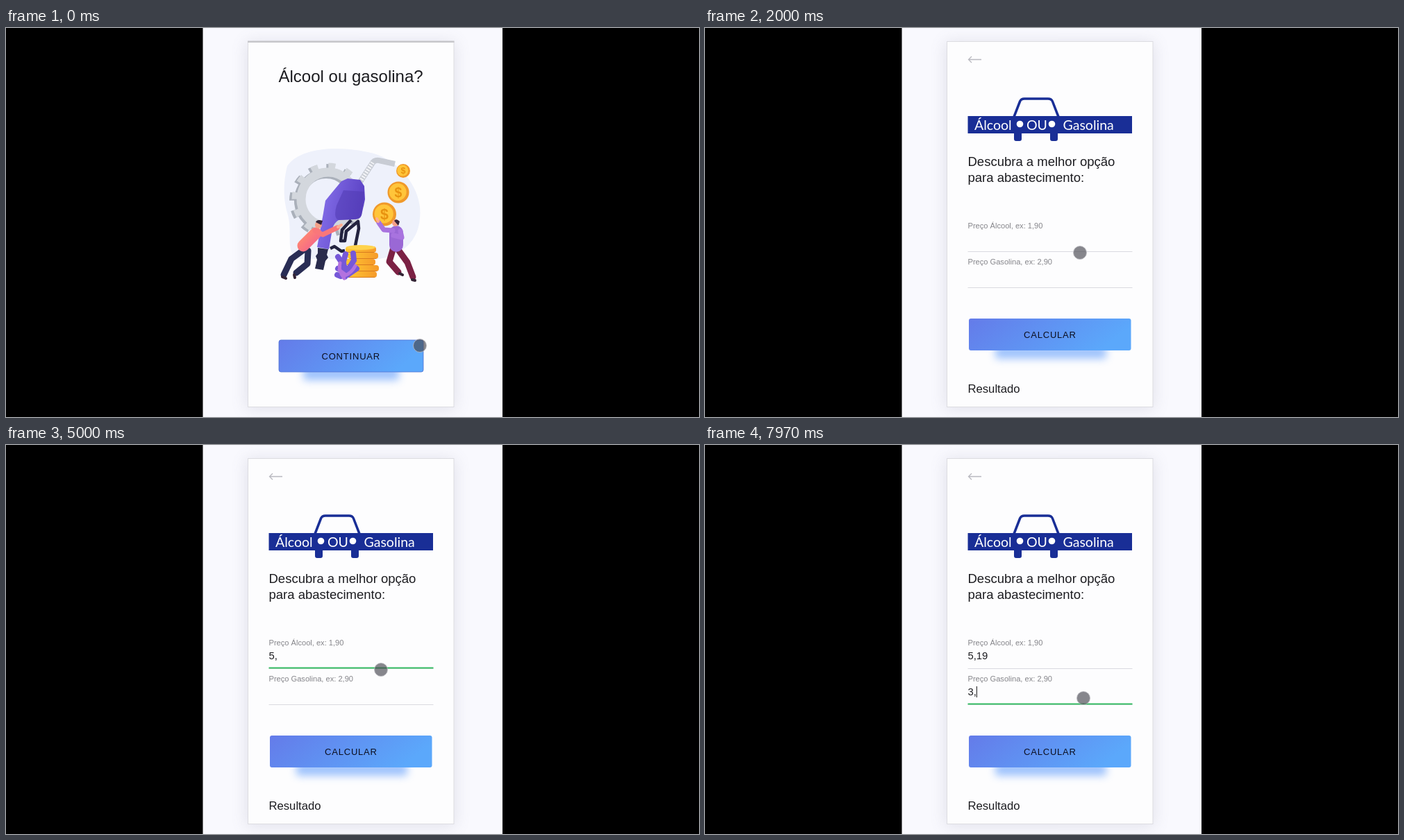
An HTML page for the animation above (8 s loop, 998x561 px).

```html
<!DOCTYPE html>
<html lang="pt">
<head>
<meta charset="utf-8">
<title>Álcool ou gasolina?</title>
<style>
  html, body { margin: 0; width: 100%; height: 100%; overflow: hidden; background: #000; }
  svg { display: block; width: 100vw; height: 100vh; }
  text { font-family: "Liberation Sans", Arial, sans-serif; fill: #1c1c20; }
  .title { font-size: 24px; }
  .lead { font-size: 18.5px; }
  .label { font-size: 11.1px; fill: #85858a; }
  .value { font-size: 14.8px; }
  .result { font-size: 16.67px; }
  .button { font-size: 13px; letter-spacing: .8px; fill: #0c0f20; }
  .brand { font-family: Lato, sans-serif; font-size: 19.5px; fill: #fff; }
  .coin { font-weight: bold; fill: #e8920f; text-anchor: middle; }
</style>
</head>
<body>
<svg viewBox="0 0 998 561">
  <defs>
    <linearGradient id="blue" x1="0" y1="0" x2="1" y2=".25">
      <stop offset="0" stop-color="#647be9"/><stop offset="1" stop-color="#5ba8fb"/>
    </linearGradient>
    <linearGradient id="pump" x1="0" y1="0" x2="1" y2=".3">
      <stop offset="0" stop-color="#8a75ee"/><stop offset="1" stop-color="#5b42c4"/>
    </linearGradient>
    <linearGradient id="gold">
      <stop offset="0" stop-color="#ffc933"/><stop offset="1" stop-color="#f69a2a"/>
    </linearGradient>
    <linearGradient id="shirt" x1="0" y1="0" x2="1" y2="1">
      <stop offset="0" stop-color="#ff8a70"/><stop offset="1" stop-color="#f4668a"/>
    </linearGradient>
    <filter id="soft" x="-20%" y="-100%" width="140%" height="300%"><feGaussianBlur stdDeviation="6"/></filter>
    <filter id="halo" x="-20%" y="-20%" width="140%" height="140%"><feGaussianBlur stdDeviation="11"/></filter>
    <clipPath id="card"><rect x="348" y="19" width="297" height="527"/></clipPath>
    <clipPath id="column"><rect x="283.5" width="431.5" height="561"/></clipPath>
  </defs>

  <rect width="998" height="561"/>
  <g clip-path="url(#column)">
    <rect x="283" width="433" height="561" fill="#f9f9fe"/>
    <rect x="346" y="20" width="301" height="530" fill="#70708c" opacity=".17" filter="url(#halo)"/>
  </g>
  <rect x="348" y="19" width="297" height="527" fill="#fdfdfe"/>

  <g clip-path="url(#card)">
    <g id="home">
      <text class="title" x="392.5" y="78">Álcool ou gasolina?</text>
      <path fill="#eef1fb" d="M405 199C422 173 477 169 521 179C565 187 601 232 596 274C594 306 572 329 532 334L420 333C400 321 415 294 404 263C398 238 401 215 405 199Z"/>

      <g fill="none" stroke="#aab0ba" transform="translate(-3 2)">
        <circle cx="464" cy="247" r="39" stroke-width="14"/>
        <circle cx="464" cy="247" r="48" stroke-width="10" stroke-dasharray="11 14.13"/>
      </g>
      <g fill="none" stroke="#d3d7dd">
        <circle cx="464" cy="247" r="39" stroke-width="13"/>
        <circle cx="464" cy="247" r="48" stroke-width="9" stroke-dasharray="10 15.13"/>
      </g>

      <path d="M510 222L527 196Q530 190 537 191L560 196" fill="none" stroke="#c8ccd4" stroke-width="8"/>
      <path d="M512 219L528 194" fill="none" stroke="#f4f5f8" stroke-width="6" stroke-dasharray="2 2"/>
      <path d="M497 277L484 291L482 307L488 307L490 293L507 279L508 289L503 314M467 318L473 315L483 322L488 321" fill="none" stroke="#23233f" stroke-width="4.5" stroke-linejoin="round"/>
      <path fill="url(#pump)" d="M483 221L492 217L510 219L516 228L517 247L512 270Q510 276 501 276L479 277Q472 281 470 290L465 319L448 316L457 267L460 249Q468 239 483 221Z"/>
      <path fill="#513bb3" opacity=".55" d="M486 234L516 236L512 270Q510 276 501 276L479 277Q471 274 476 256Z"/>
      <path fill="#292b4c" d="M449 317L464 319L462 327L464 331L460 336L457 349L445 347L448 334L446 329L449 325Z"/>

      <g id="stack"></g>
      <g stroke="#7658d8" stroke-width="8" stroke-linecap="round" fill="none">
        <path d="M488 359L486 337L489 326M488 352L478 347M488 345L478 330M492 350L501 335L500 325M492 356L505 347M482 358L477 356"/>
      </g>
      <path d="M487 361Q478 350 481 339M488 357Q498 353 503 343M480 349L488 355" fill="none" stroke="#b372df" stroke-width="5" stroke-linecap="round"/>
      <g id="coins"></g>

      <g fill="none" stroke-linecap="round" stroke-linejoin="round">
        <path d="M430 319L411 333L400 356M435 321L434 340L418 353" stroke="#292d55" stroke-width="9"/>
        <path d="M398 359L403 361M415 356L416 360" stroke="#332435" stroke-width="4"/>
        <path d="M446 296L428 314" stroke="url(#shirt)" stroke-width="17"/>
        <path d="M445 292L456 298L477 288" stroke="#f9777a" stroke-width="7"/>
        <path d="M478 287L483 284" stroke="#ffae91" stroke-width="4"/>
        <path d="M557 320L552 337L565 352M565 320L578 338L586 359" stroke="#7b2144" stroke-width="9"/>
        <path d="M567 354L571 356M585 363L589 364" stroke="#332435" stroke-width="4"/>
        <path d="M562 295L562 313" stroke="#9a68d5" stroke-width="20"/>
        <path d="M557 292L544 291L537 281M568 293L570 302L558 299" stroke="#a873df" stroke-width="7"/>
        <path d="M536 279L534 275" stroke="#ffae91" stroke-width="4"/>
      </g>
      <g fill="#f3a088"><circle cx="450" cy="284" r="5"/><circle cx="561" cy="281" r="5"/></g>
      <path fill="#322338" d="M446 280Q448 275 456 278L454 284ZM559 278Q562 274 567 279L565 285Z"/>

      <rect x="428" y="488" width="138" height="20" rx="4" fill="#5e9bfb" opacity=".6" filter="url(#soft)"/>
      <rect x="393" y="450" width="208" height="46" rx="3" fill="url(#blue)" stroke="#4f72d4" stroke-width=".8"/>
      <text class="button" x="454.5" y="477.5">CONTINUAR</text>
    </g>

    <g id="form">
      <rect x="348" y="19" width="297" height="600" fill="#fdfdfe"/>
      <path d="M398 45.5H379.500M384 41L379.500 45.5L384 50" fill="none" stroke="#b9b9c0" stroke-width="1.3"/>
      <path d="M445 128L453.500 106Q455 102 460 102H494Q499 102 500.500 106L509 128" fill="#fdfdfe" stroke="#192e96" stroke-width="3.500"/>
      <path d="M378.500 127H615V152H508V160Q508 163 505 163H500Q497 163 497 160V152H456V160Q456 163 453 163H448Q445 163 445 160V152H378.500Z" fill="#192e96"/>
      <circle cx="453.500" cy="138.500" r="4.800" fill="#fff"/><circle cx="499.500" cy="138.500" r="4.800" fill="#fff"/>
      <text class="brand" x="388" y="147">Álcool</text>
      <text class="brand" x="463" y="147">OU</text>
      <text class="brand" x="515.500" y="147">Gasolina</text>
      <text class="lead" x="378.500" y="199">Descubra a melhor opção</text>
      <text class="lead" x="378.500" y="221.500">para abastecimento:</text>
      <g id="fields"></g>
      <rect x="418" y="458" width="160" height="19" rx="4" fill="#5e9bfb" opacity=".6" filter="url(#soft)"/>
      <rect x="380" y="419" width="233.500" height="46" rx="3" fill="url(#blue)"/>
      <text class="button" x="459" y="447">CALCULAR</text>
      <text class="result" x="378.500" y="525.500">Resultado</text>
    </g>
    <rect id="scrollbar" x="638.500" y="80" width="2.500" height="431" fill="#8c8c90"/>
  </g>
  <rect x="348.500" y="19.500" width="296.500" height="527" fill="none" stroke="#dcdce1"/>
  <rect id="topEdge" x="348" y="18.500" width="297.500" height="2.500" fill="#c6c6ca"/>
  <circle id="cursor" r="9.500" fill="#46464e" fill-opacity=".65" stroke="#bcbcc2" stroke-opacity=".8"/>
</svg>

<script>
  const LOOP = 8000, ENTER = 826, ENTER_TIME = 280, BLINK = 530;
  const $ = id => document.getElementById(id);
  const clamp = v => Math.max(0, Math.min(1, v));
  const ramp = (t, from, to) => clamp((t - from) / (to - from));
  const mix = (a, b, p) => a + (b - a) * p;

  // Page entry easing: cubic-bezier(.36, .66, .04, 1)
  function enterEase(x) {
    const curve = (u, a, b) => 3 * (1 - u) ** 2 * u * a + 3 * (1 - u) * u * u * b + u ** 3;
    let low = 0, high = 1;
    for (let i = 0; i < 24; i++) {
      const mid = (low + high) / 2;
      if (curve(mid, .36, .04) < x) low = mid; else high = mid;
    }
    return curve(low, .66, 1);
  }

  $('stack').innerHTML = [490, 493, 488, 492, 489].map((x, i) => {
    const y = 351 - i * 9;
    return `<rect x="${x}" y="${y}" width="44" height="9" rx="4" fill="url(#gold)"/>
      <path d="M${x + 3} ${y + 8.5}h38" stroke="#d97c20"/>`;
  }).join('') + '<ellipse cx="511" cy="316.5" rx="21" ry="3.5" fill="#ffd34d"/>';

  $('coins').innerHTML = [[572, 206, 10], [565, 237, 15.5], [545, 268.5, 17]].map(([x, y, r]) =>
    `<circle cx="${x}" cy="${y}" r="${r}" fill="#f0992a"/>
     <circle cx="${x - .8}" cy="${y - .5}" r="${r * .8}" fill="#ffc53a"/>
     <text class="coin" x="${x}" y="${y + r * .43}" font-size="${r * 1.25}">$</text>`).join('');

  const fields = [
    { label: 'Preço Álcool, ex: 1,90', y: 285, focus: 2600, blur: 6900,
      keys: [[4050, '5'], [4350, ','], [5200, '1'], [5400, '9']] },
    { label: 'Preço Gasolina, ex: 2,90', y: 337, focus: 6900, blur: LOOP,
      keys: [[7450, '3'], [7700, ',']] }
  ];
  for (const f of fields) {
    const group = document.createElementNS('http://www.w3.org/2000/svg', 'g');
    group.innerHTML = `<text class="label" x="378.5" y="${f.y + 4}">${f.label}</text>
      <path d="M378.5 ${f.y + 37.5}H615.5" stroke="#dadae0"/>
      <path d="M378.5 ${f.y + 36.5}H615.5" stroke-width="2"/>
      <text class="value" x="378.5" y="${f.y + 24}"></text>
      <rect y="${f.y + 11}" width="1" height="16" fill="#111"/>`;
    $('fields').append(group);
    [, , f.line, f.value, f.caret] = group.children;
  }

  const cursorPath = [
    [0, 596, 458], [400, 568, 490], [1150, 568, 490], [1750, 540, 324],
    [6350, 540, 324], [6750, 545, 365], [LOOP, 545, 365]
  ];

  function drawCursor(t) {
    const i = cursorPath.findIndex(step => step[0] > t);
    const [t0, x0, y0] = cursorPath[i - 1], [t1, x1, y1] = cursorPath[i];
    const p = ramp(t, t0, t1), eased = p * p * (3 - 2 * p);
    $('cursor').setAttribute('transform', `translate(${mix(x0, x1, eased)} ${mix(y0, y1, eased)})`);
    $('cursor').style.opacity = t >= 5200 && t < 6350 ? 0 : 1;
  }

  function drawField(f, t) {
    const typed = f.keys.filter(key => key[0] <= t);
    const focused = t >= f.focus && t < f.blur;
    const p = ramp(t, f.focus + 100, f.focus + 300);
    f.value.textContent = typed.map(key => key[1]).join('');
    f.line.style.opacity = focused ? 1 : 0;
    f.line.style.stroke = `rgb(${mix(56, 52, p)} ${mix(128, 187, p)} ${mix(255, 98, p)})`;
    const since = t - (typed.length ? typed[typed.length - 1][0] : f.focus);
    f.caret.style.opacity = focused && Math.floor(since / BLINK) % 2 === 0 ? 1 : 0;
    f.caret.setAttribute('x', 378.5 + (typed.length ? f.value.getComputedTextLength() : 0));
  }

  function draw(t) {
    const p = enterEase(ramp(t, ENTER, ENTER + ENTER_TIME));
    $('form').style.opacity = t < ENTER ? 0 : p;
    $('form').setAttribute('transform', `translate(0 ${40 * (1 - p)})`);
    $('home').style.display = p > .999 ? 'none' : '';
    $('scrollbar').style.opacity = ramp(t, ENTER, ENTER + 80) * (1 - ramp(t, 1400, 1600));
    $('topEdge').style.opacity = 1 - ramp(t, 960, 1120);
    for (const f of fields) drawField(f, t);
    drawCursor(t);
  }

  const start = performance.now();
  function tick() {
    draw((performance.now() - start) % LOOP);
    requestAnimationFrame(tick);
  }
  tick();
</script>
</body>
</html>
```
